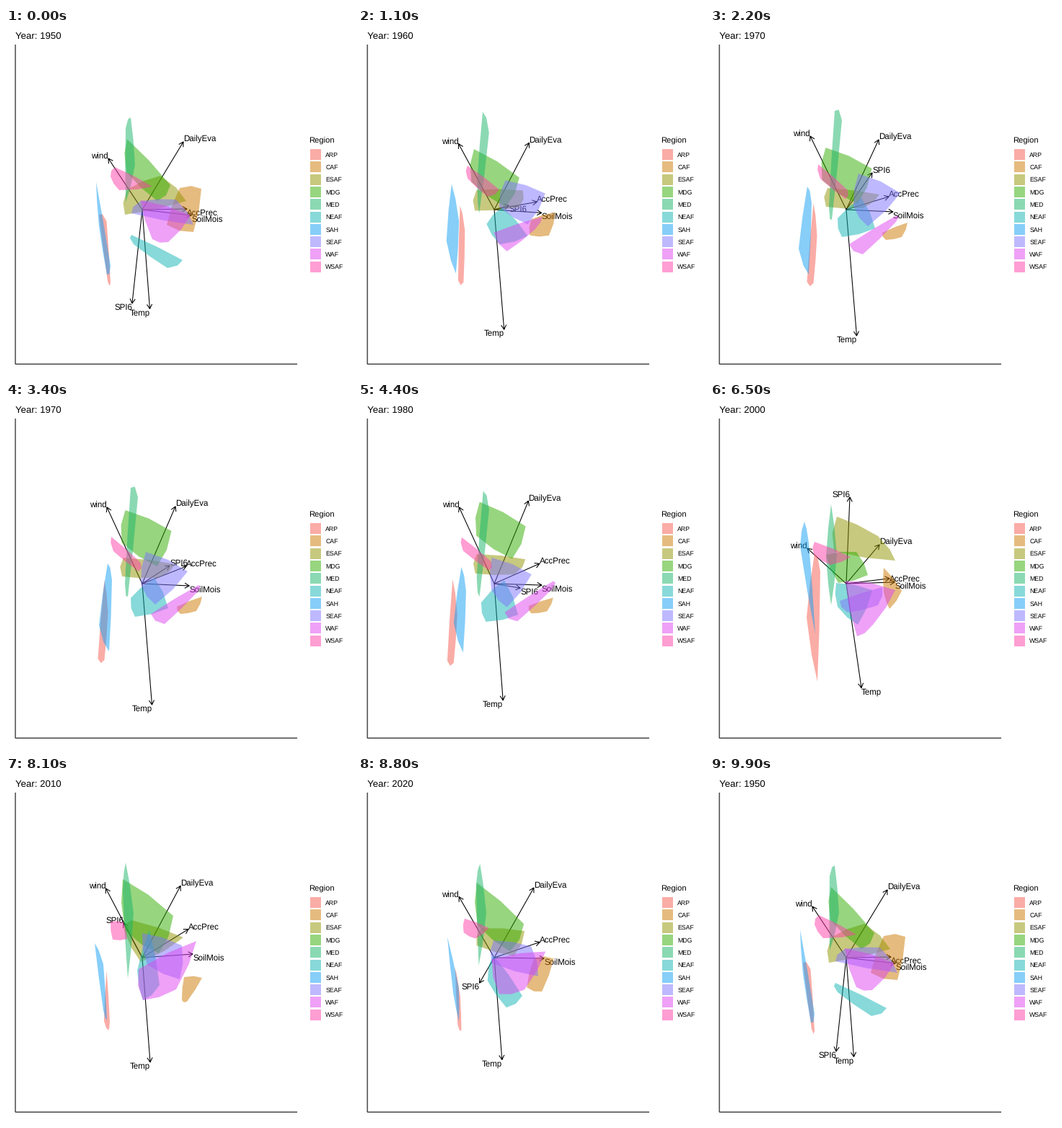
Write a matplotlib script that moves like this. It is 480 by 480 pixels and loops after 10000 ms.

```python
import numpy as np
import matplotlib.pyplot as plt
from matplotlib.animation import FuncAnimation

SIZE, DPI = 480, 72
FRAMES, INTERVAL = 100, 100
ORIGIN = np.array([189.0, 252.0])
LEFT, RIGHT, TOP, BOTTOM = 13.0, 404.0, 23.0, 466.2
MIDDLE = (LEFT + RIGHT) / 2, (TOP + BOTTOM) / 2 + 0.2
YEARS = [*range(1950, 2030, 10), 1950]
# last resting frame and first arrived frame of each transition
SPANS = [(4, 14), (17, 27), (30, 40), (43, 51),
         (55, 63), (68, 77), (80, 88), (92, 99)]

plt.rcParams["font.family"] = "Liberation Sans"
plt.rcParams["text.hinting"] = "none"

fig = plt.figure(figsize=(SIZE / DPI, SIZE / DPI), dpi=DPI, facecolor="white")
ax = fig.add_axes([0, 0, 1, 1])
ax.set_xlim(0, SIZE)
ax.set_ylim(SIZE, 0)
ax.axis("off")


def decades(drift, *poses):
    """All nine states; 1960 and 1980 drift away from 1970."""
    drift = np.array(drift)
    s50, s70, s90, s00, early10 = [
        np.array(p, float).reshape(-1, 2) for p in poses]
    s10 = early10 + (early10 - s50) / 15
    s20 = (s10 + s50) / 2
    return [s50, s70 - 2 * drift, s70, s70 + 2.5 * drift, s90, s00,
            s10, s20, s50]


def bulge(corners, amount=1.12):
    """Turn four corners into a convex hull with eight."""
    centre = corners.mean(axis=0)
    mids = (corners + np.roll(corners, -1, axis=0)) / 2
    mids = centre + (mids - centre) * amount
    return np.stack([corners, mids], axis=1).reshape(-1, 2)


hulls, arrows = [], []


def region(name, color, drift, *poses):
    """Add a legend row and a hull given by four corners per pose."""
    y = 175.6 + 17.28 * len(hulls)
    ax.add_patch(plt.Rectangle((422, y - 7.5), 15, 15,
                               fc=color, ec="none", alpha=0.5))
    ax.text(443.4, y + 3.2, name, size=8.8)
    patch = plt.Polygon([(0, 0)], closed=True, fc=color, ec="none",
                        alpha=0.5, zorder=4)
    ax.add_patch(patch)
    hulls.append((patch, decades(drift, *poses)))


def variable(name, drift, *poses):
    """Add a labelled arrow given by its tip per pose."""
    line, = ax.plot([], [], color="black", lw=1.07, zorder=2,
                    solid_capstyle="butt")
    label = ax.text(0, 0, name, size=11.5, zorder=3)
    arrows.append((line, label, decades(drift, *poses)))


# poses: 1950, 1970, 1990, 2000, just after 2010
region("ARP", "#F75B4F", (-3.5, 2),
       (129, 259, 139.5, 268, 145, 354, 141, 351),
       (140, 245, 145, 290, 140, 356, 131, 354),
       (132, 218, 148, 293, 143, 369, 135, 360),
       (145, 211, 153, 235, 149, 388, 134, 299),
       (139.5, 270, 144, 340, 142, 353, 136, 340))
region("CAF", "#CD7901", (-1, 0),
       (241, 222, 271, 223, 260, 283, 223, 273),
       (238, 284, 273, 270, 265, 290, 243, 294),
       (247, 274, 273, 282, 260, 293, 239, 288),
       (241, 230, 266, 262, 249, 287, 241, 264),
       (247, 279, 272, 280, 251, 313, 244, 311))
region("ESAF", "#919501", (0, -3),
       (168, 224, 214, 205, 250, 240, 165, 259),
       (163, 219, 235, 228, 212, 247, 161, 245),
       (176, 207, 213, 202, 252, 237, 175, 241),
       (176, 159, 233, 186, 257, 220, 172, 207),
       (174, 200, 246, 224, 187, 258, 164, 214))
region("MDG", "#31AD01", (2.5, -8),
       (168, 154, 228, 218, 210, 240, 167, 200),
       (163, 158, 227, 187, 207, 236, 158, 203),
       (165, 143, 228, 211, 218, 228, 163, 203),
       (161, 212, 203, 208, 219, 240, 178, 251),
       (162, 143, 232, 194, 212, 246, 165, 214))
region("MED", "#19B569", (0, 2),
       (173, 124, 179, 190, 166, 242, 166, 139),
       (173, 117, 183, 130, 169, 268, 165, 250),
       (178, 134, 174, 253, 165, 250, 162, 160),
       (168, 142, 176, 212, 168, 282, 161, 215),
       (166, 120, 177, 190, 169, 281, 162, 160))
region("NEAF", "#13B5B5", (-2, 4),
       (174, 287, 245, 322, 224, 333, 177, 300),
       (208, 240, 227, 282, 181, 294, 175, 268),
       (202, 228, 222, 317, 188, 311, 177, 280),
       (175, 251, 225, 261, 205, 309, 177, 284),
       (199, 214, 213, 290, 190, 311, 182, 270))
region("SAH", "#119FF5", (3, 2),
       (125, 213, 145, 330, 140, 342, 129, 275),
       (138, 222, 144, 245, 140, 344, 126, 308),
       (129, 242, 139, 348, 134, 338, 127.5, 260),
       (131, 166, 137, 195, 146, 322, 125, 200),
       (123, 232, 135, 261, 140, 338, 135, 325))
region("SEAF", "#7F75FF", (-6, 3),
       (187, 240, 236, 238, 260, 273, 174, 257),
       (200, 205, 258, 232, 213, 278, 193, 250),
       (189, 240, 225, 237, 268, 279, 234, 280),
       (180, 276, 239, 257, 233, 282, 191, 292),
       (189, 218, 244, 235, 241, 282, 196, 262))
region("WAF", "#DF45F1", (4, -3),
       (187, 239, 256, 260, 225, 297, 203, 293),
       (197, 297, 263, 257, 262, 266, 216, 311),
       (179, 307, 256, 241, 257, 259, 187, 309),
       (188, 248, 257, 261, 226, 309, 204, 325),
       (184, 268, 264, 229, 236, 296, 190, 311))
region("WSAF", "#FF3FA9", (-2, -1),
       (151, 193, 203, 220, 157, 225, 145, 206),
       (148, 188, 189, 224, 186, 236, 151, 208),
       (150, 203, 189, 219, 190, 236, 145, 214),
       (145, 194, 195, 215, 167, 226, 144, 212),
       (145, 202, 163, 203, 168, 226, 148, 227))

variable("wind", (0.5, -2),
         (142, 181), (139.5, 148), (137, 167), (135, 203), (138.5, 156))
variable("DailyEva", (0.5, -5),
         (246, 158), (234.5, 150), (241.5, 135), (235, 198), (242, 152.5))
variable("AccPrec", (1, -3),
         (251, 251), (249, 231), (254, 229.5), (249, 244.8), (253, 212.5))
variable("SoilMois", (0.2, 0),
         (257, 260), (254, 255), (257, 247.5), (256, 250), (259, 247))
variable("SPI6", (1, 13),
         (175, 382), (226, 214), (201, 339.5), (194, 132), (163, 204))
variable("Temp", (-0.5, -3.5),
         (199.5, 389.5), (203, 423.5), (197, 406.5), (210, 396.5),
         (200, 397))

ax.plot([LEFT, LEFT, RIGHT], [TOP, BOTTOM, BOTTOM], color="black", lw=1.07,
        solid_capstyle="butt", solid_joinstyle="miter", snap=False)
title = ax.text(13, 15, "", size=13.2)
ax.text(420.4, 160, "Region", size=11.2)


def place_arrow(line, label, tip):
    ang = np.arctan2(*(ORIGIN - tip)[::-1])
    a, b = [tip + 7.2 * np.array([np.cos(ang + s), np.sin(ang + s)])
            for s in (-np.pi / 6, np.pi / 6)]
    gap = [np.nan, np.nan]
    line.set_data(*np.array([ORIGIN, tip, gap, a, tip, b]).T)
    # labels grow outward from the panel centre
    dx, dy = tip - MIDDLE
    drop = 4.2 if abs(dy) < 0.45 else 8.6 if dy > 0 else 0
    label.set_position((tip[0], tip[1] + drop))
    label.set_ha("left" if dx > 0 else "right")


def locate(frame):
    """Transition index and linear progress at a frame."""
    for i, (start, end) in enumerate(SPANS):
        if frame <= end:
            break
    return i, np.clip((frame - start) / (end - start), 0, 1)


def update(frame):
    i, t = locate(frame)

    def mix(states):
        return states[i] + (states[i + 1] - states[i]) * t

    title.set_text(f"Year: {YEARS[i + int(t >= 0.5)]}")
    for patch, states in hulls:
        patch.set_xy(bulge(mix(states)))
    for line, label, states in arrows:
        place_arrow(line, label, mix(states)[0])
    return []


anim = FuncAnimation(fig, update, frames=FRAMES, interval=INTERVAL,
                     init_func=lambda: update(0), repeat=True, repeat_delay=0)
plt.show()
```
